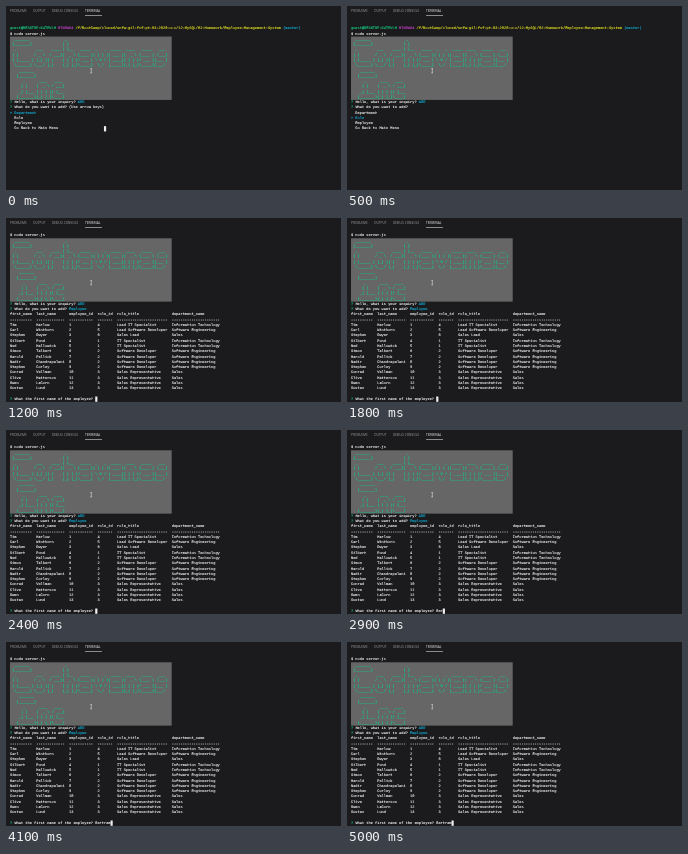
These frames come from a looping animation (335 by 184 pixels, 5.1 s). An HTML page:

```html
<!DOCTYPE html>
<html lang="en">
<head>
<meta charset="utf-8">
<title>Terminal</title>
<style>
html, body { margin: 0; width: 100%; height: 100%; overflow: hidden; background: #1b1a1d; }
#stage { position: relative; width: 335px; height: 184px; overflow: hidden; }
.tab, #line, #mouse, .screen, .row, .banner, .cursor { position: absolute; }
.tab {
  top: 0; left: 0; transform-origin: 0 0; white-space: pre; color: #a0a0a2;
  font: 20px/20px "Open Sans", "Noto Sans", sans-serif;
}
.tab.on { color: #f0f0f0; }
#line { left: 79px; top: 9px; width: 17px; height: 1px; background: #8a8a8a; }
.screen {
  left: 3.7px; top: 0; width: 1800px; height: 1100px;
  transform-origin: 0 0; color: #e8e8e8;
  font: 20px "Liberation Mono", "DejaVu Sans Mono", monospace;
  text-rendering: geometricPrecision; font-variant-ligatures: none;
  -webkit-text-stroke: .7px;
}
.row { left: 0; white-space: pre; }
.banner { left: 0; background: #666; }
.cursor { background: #f0f0f0; width: 12px; }
b { color: #fff; -webkit-text-stroke: 0; }
.g { color: #16c77f; }
.m { color: #bc3fbc; }
.y { color: #dedb20; }
.c { color: #11a8cd; }
.art { color: #10c886; font-weight: bold; }
#mouse { left: 83.7px; top: 62.4px; width: 2.6px; height: 5.2px; }
</style>
</head>
<body>
<div id="stage">
  <div id="line"></div>
  <svg id="mouse" viewBox="0 0 3 6"><path d="M.3.4H2.7M1.5.4V5.6M.3 5.6H2.7" stroke="#e0e0e0" stroke-width=".7" fill="none"/></svg>
</div>
<script>
const LOOP = 5100, CELL = 2.185, LINE = 5.275;
const SCALE = CELL / 12, ROW = LINE / SCALE;
const stage = document.getElementById("stage");
const mouse = document.getElementById("mouse");

const GLYPHS = {
  C: [" _______ ", "(_______)", " _       ", "| |      ", "| |_____ ", " \\______)"],
  I: [" _______ ", "(_______)", "   _     ", "  | |    ", " _| |___ ", "(_______)"],
  h: [" _     ", "| |    ", "| |__  ", "|  _ \\ ", "| | | |", "|_| |_|"],
  o: ["", "", "  ___  ", " / _ \\ ", "| |_| |", " \\___/ "],
  r: ["", "", "  ____ ", " / ___)", "| |    ", "|_|    "],
  a: ["", "", " _____ ", "(____ |", "/ ___ |", "\\_____|"],
  v: ["", "", " _   _ ", "| | | |", " \\ V / ", "  \\_/  "],
  e: ["", "", " _____ ", "| ___ |", "| ____|", "|_____)"],
  n: ["", "", " ____  ", "|  _ \\ ", "| | | |", "|_| |_|"],
  s: ["", "", "  ___  ", " /___) ", "|___ | ", "(___/  "],
  c: ["", "", " ____ ", "/ ___)", "( (___", "\\____)"]
};

const esc = s => s.replace(/&/g, "&amp;").replace(/</g, "&lt;").replace(/>/g, "&gt;");
const tint = (cls, s) => `<span class="${cls}">${esc(s)}</span>`;
const ask = (q, answer = "") => tint("g", "?") + ` <b>${esc(q)}</b> ` + answer;

function add(parent, cls, top, height) {
  const el = document.createElement("div");
  el.className = cls;
  el.style.top = top + "px";
  if (height) el.style.height = height + "px";
  parent.append(el);
  return el;
}

function makeScreen(top) {
  const el = add(stage, "screen", top);
  el.style.transform = `scale(${SCALE})`;
  return el;
}

function put(screen, r, html, cls = "") {
  const el = add(screen, "row " + cls, r * ROW);
  el.style.lineHeight = ROW + "px";
  el.innerHTML = html;
  return el;
}

function word(screen, r, col, text) {
  for (let i = 0; i < 6; i++) {
    const s = [...text].map(ch => GLYPHS[ch][i].padEnd(GLYPHS[ch][5].length)).join("");
    put(screen, r + i, esc(" ".repeat(col) + s), "art");
  }
}

function banner(screen, r) {
  add(screen, "banner", r * ROW, 12 * ROW).style.width = 74 * 12 + "px";
  word(screen, r, 1, "Corhavenas");
  word(screen, r + 6, 3, "Inc");
}

function makeCursor(screen, r) {
  return add(screen, "cursor", r * ROW, ROW);
}

function setCursor(el, col, on) {
  el.style.left = col * 12 + "px";
  el.style.display = on ? "" : "none";
}

// tab bar
[["PROBLEMS", 4], ["OUTPUT", 27], ["DEBUG CONSOLE", 46], ["TERMINAL", 79]].forEach(([name, x], i) => {
  const el = add(stage, i === 3 ? "tab on" : "tab", 0);
  el.textContent = name;
  el.style.transform = `translate(${x}px, 3.7px) scale(.16)`;
});

const hello = ask("Hello, what is your inquiry?", tint("c", "ADD"));
const addQuestion = "What do you want to add?";

// menu screen
const TOP = 15.2;
const menu = makeScreen(TOP + LINE);
put(menu, 0, tint("g", "guest@DESKTOP-K4TRVLM") + " " + tint("m", "MINGW64") + " " +
  tint("y", "/f/BootCamp/cloned/unfw-gil-fsf-pt-03-2020-u-c/12-MySQL/02-Homework/Employee-Management-System") +
  " " + tint("c", "(master)"));
put(menu, 1, "$ node server.js");
banner(menu, 2);
put(menu, 14, hello);
const question = put(menu, 15, "");
const options = ["Department", "Role", "Employee", "Go Back to Main Menu"];
const items = options.map((_, i) => put(menu, 16 + i, ""));
const menuCursor = makeCursor(menu, 19);

// table screen
const table = makeScreen(TOP);
const WIDTHS = [10, 13, 11, 7, 23, 22];
const JOBS = {
  1: ["IT Specialist", "Information Technology"],
  2: ["Software Developer", "Software Engineering"],
  3: ["Sales Representative", "Sales"],
  4: ["Lead IT Specialist", "Information Technology"],
  5: ["Lead Software Developer", "Software Engineering"],
  6: ["Sales Lead", "Sales"]
};
const STAFF = [
  "Tim Harlow 4", "Carl Winthorn 5", "Stephen Dwyer 6", "Gilbert Pond 1", "Ned Hallowick 1",
  "Simon Talbert 2", "Harold Pellick 2", "Nadir Chandrapalani 2", "Stephen Corley 2",
  "Conrad Vellman 3", "Clive Hatterson 3", "Owen LaCorn 3", "Gustav Lund 3"
];
const cells = list => esc(list.map((s, i) => String(s).padEnd(WIDTHS[i])).join("  "));
put(table, 0, "$ node server.js");
banner(table, 1);
put(table, 13, hello);
put(table, 14, ask(addQuestion, tint("c", "Employee")));
put(table, 15, cells(["first_name", "last_name", "employee_id", "role_id", "role_title", "department_name"]));
put(table, 16, cells(WIDTHS.map(w => "-".repeat(w))));
STAFF.forEach((line, i) => {
  const [first, last, role] = line.split(" ");
  put(table, 17 + i, cells([first, last, i + 1, role, ...JOBS[role]]));
});
const entry = put(table, 31, "");
const entryCursor = makeCursor(table, 31);
stage.append(mouse);

const NAME = "Bertram";
const KEYS = [2600, 2700, 2900, 3000, 3200, 3500, 3800];
const DARK = [[500, 1000], [4400, 4900]];

let last = "";
function draw(t) {
  const inMenu = t < 1200;
  const pick = t < 400 ? 0 : t < 800 ? 1 : 2;
  const typed = KEYS.filter(k => t >= k).length;
  const lit = !DARK.some(([a, b]) => t >= a && t < b);
  const key = [inMenu, pick, typed, lit].join();
  if (key === last) return;
  last = key;

  menu.style.display = inMenu ? "" : "none";
  table.style.display = inMenu ? "none" : "";
  if (inMenu) {
    question.innerHTML = ask(addQuestion, pick ? "" : "(Use arrow keys)");
    items.forEach((el, i) => {
      el.innerHTML = i === pick ? tint("c", "> " + options[i]) : "  " + options[i];
    });
    setCursor(menuCursor, pick ? 27 : 43, lit);
  } else {
    entry.innerHTML = ask("What the first name of the employee?", NAME.slice(0, typed));
    setCursor(entryCursor, 39 + typed, lit);
  }
}

const start = performance.now();
function tick() {
  draw((performance.now() - start) % LOOP);
  requestAnimationFrame(tick);
}
tick();
</script>
</body>
</html>
```
